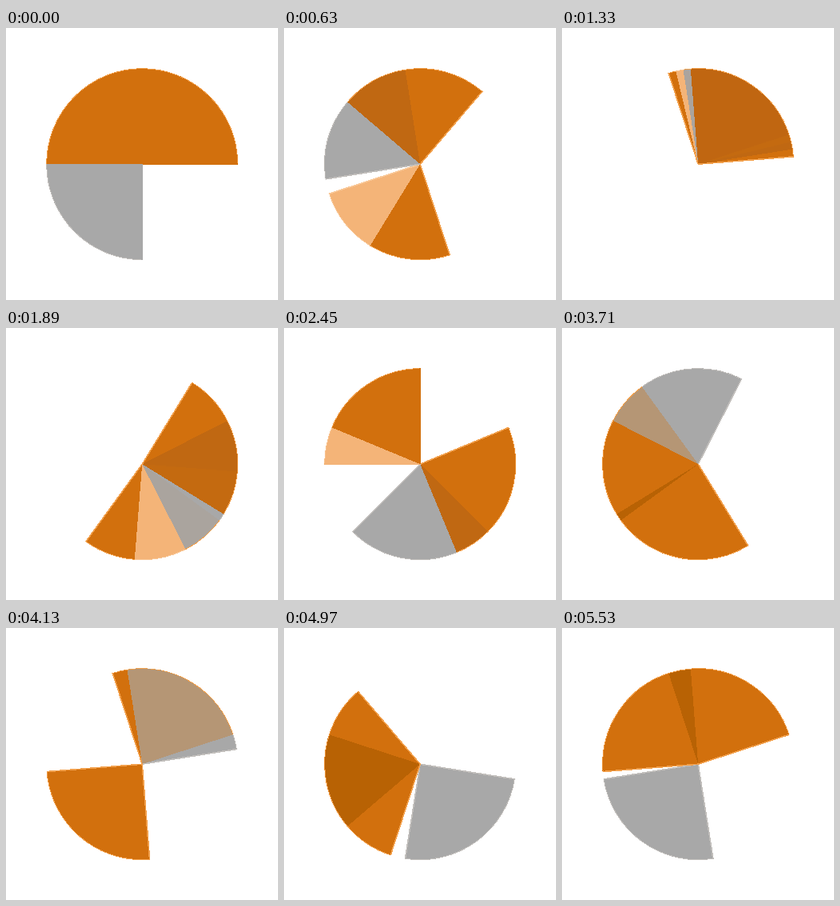
These frames come from a looping animation (340x340 px, 5.6 s). An HTML page:

```html
<!DOCTYPE html>
<html lang="en">
<head>
<meta charset="utf-8">
<title>Turning wedges</title>
<style>
  html, body { margin: 0; width: 100%; height: 100%; overflow: hidden; background: #fff; }
  svg { display: block; width: 100%; height: 100%; }
</style>
</head>
<body>
<svg id="stage" viewBox="0 0 340 340" shape-rendering="crispEdges"></svg>
<script>
const LOOP = 5600, STEP = 70, MID = 170.2, R = 120;
const stage = document.getElementById('stage');

// Quarter wedges from bottom to top: start bearing and turns per loop.
const wedges = [
  { from: 0, turns: 4 },   // orange
  { from: 90, turns: 3 },  // white
  { from: 180, turns: 2 }, // grey
  { from: 270, turns: 1 }  // orange
];

// Blend for each set of overlapping wedges, one bit per wedge.
const blends = [
  '', '#d2700d', '', '#f4b478',
  '#a8a8a8', '#b59675', '#a8a8a8', '#aaa49e',
  '#d2700d', '#b86204', '#d2700d', '#c8690c',
  '#c06812', '#bc660a', '#c46a10', '#c06611'
];

const mod = a => ((a % 360) + 360) % 360;

function at(angle, r) {
  const a = angle * Math.PI / 180;
  return (MID + r * Math.sin(a)).toFixed(2) + ' ' + (MID - r * Math.cos(a)).toFixed(2);
}

function arc(a, b, r) {
  return `${at(a, r)}A${r} ${r} 0 ${b - a > 180 ? 1 : 0} 1 ${at(b, r)}`;
}

function rim(mask) {
  if (mask === 3) return '#f9c898';
  return mask & 9 ? '#f2a04c' : '#c2bfbc';
}

function line(d, color, width) {
  return `<path d="M${d}" fill="none" stroke="${color}" stroke-width="${width}"/>`;
}

function slices(turn) {
  const starts = wedges.map(w => mod(w.from + w.turns * turn));
  const cuts = [...new Set(starts.flatMap(s => [s, mod(s + 90)]))].sort((a, b) => a - b);
  return cuts.map((a, i) => {
    const b = i + 1 < cuts.length ? cuts[i + 1] : cuts[0] + 360;
    const mid = (a + b) / 2;
    const mask = starts.reduce((m, s, k) => m | (mod(mid - s) < 90 ? 1 << k : 0), 0);
    return { a, b, mask, color: blends[mask] };
  });
}

function draw(time) {
  const frame = Math.floor((time % LOOP) / STEP);
  const parts = slices(frame * 360 * STEP / LOOP);
  const n = parts.length;
  let fills = '', edges = '';
  parts.forEach((p, i) => {
    if (!p.color) return;
    const next = parts[(i + 1) % n], prev = parts[(i + n - 1) % n];
    const tint = rim(p.mask);
    // Upright and level sides keep the plain fill colour.
    const spoke = angle =>
      line(`${MID} ${MID}L${at(angle, R)}`, angle % 90 ? tint : p.color, 1.6);
    fills += `<path d="M${MID} ${MID}L${arc(p.a, p.b, R)}Z" fill="${p.color}"/>`;
    edges += line(arc(p.a, p.b, R - 0.5), tint, 1);
    if (!prev.color) edges += spoke(p.a);
    if (!next.color) edges += spoke(p.b);
  });
  stage.innerHTML = fills + edges;
}

const begin = performance.now();
function tick() {
  draw(performance.now() - begin);
  requestAnimationFrame(tick);
}
tick();
</script>
</body>
</html>
```
